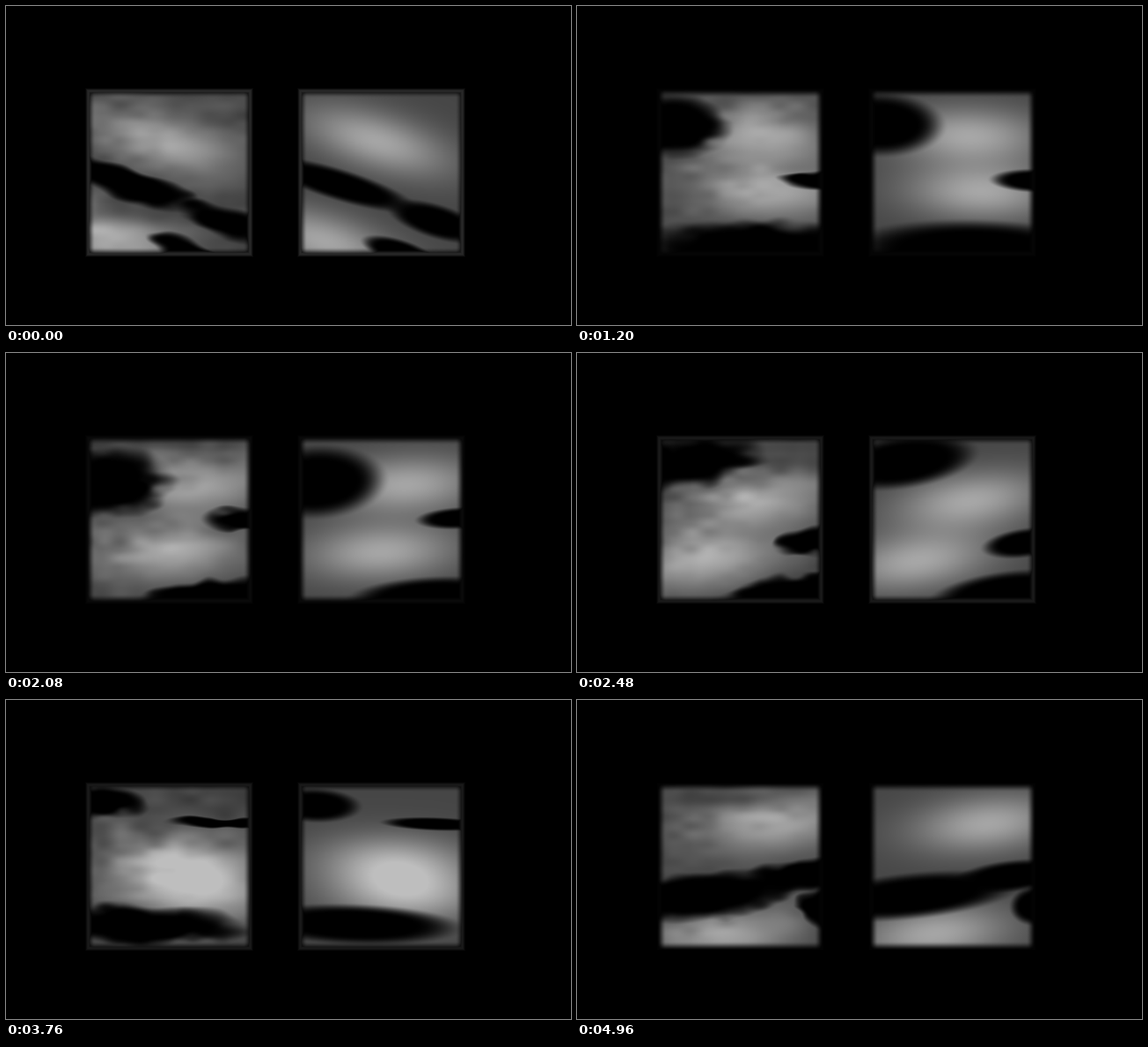
Recreate the animation shown at these times as an HTML page with a canvas. Size 642 by 362 pixels, loop 5040 ms.

```html
<!DOCTYPE html>
<html lang="en">
<head>
<meta charset="utf-8">
<title>Smoke</title>
<style>
  html, body { margin: 0; width: 100%; height: 100%; overflow: hidden; background: #000; }
  canvas { display: block; }
</style>
</head>
<body>
<canvas id="stage" width="642" height="362"></canvas>
<script>
const ctx = document.getElementById('stage').getContext('2d');
const LOOP = 5040, STEP = 80, W = 191, H = 192, TOP = 93;
const BASE = 70, GLOW = 95, PEAK = 190;

const light = (x, y) => [x, y, 85, 32];
const hole = (x, y, rx, ry) => [x, y, rx, ry];

// Two lights and three dark holes drift from pose to pose
const poses = [
  { time: 0, tilt: 17, lights: [light(90, 60), light(30, 174)],
    holes: [hole(46, 109, 66, 13), hole(158, 151, 42, 14), hole(115, 185, 32, 10)] },
  { time: 640, tilt: 1, lights: [light(95, 72), light(120, 112)],
    holes: [hole(20, 0, 55, 13), hole(190, 150, 40, 14), hole(95, 182, 150, 38)] },
  { time: 1680, tilt: 2, lights: [light(130, 38), light(135, 122)],
    holes: [hole(5, 76, 52, 38), hole(190, 66, 36, 6), hole(150, 187, 75, 15)] },
  { time: 2480, tilt: -8, lights: [light(115, 74), light(55, 143)],
    holes: [hole(38, 30, 62, 22), hole(178, 122, 36, 12), hole(155, 178, 62, 17)] },
  { time: 3120, tilt: 10, lights: [light(125, 75), light(90, 135)],
    holes: [hole(28, 17, 34, 13), hole(182, 51, 28, 5), hole(12, 127, 40, 7)] },
  { time: 4320, tilt: -5, lights: [light(95, 105), light(155, 122)],
    holes: [hole(12, 34, 42, 15), hole(135, 44, 60, 6), hole(110, 191, 130, 25)] },
  { time: 4960, tilt: -6, lights: [light(135, 47), light(75, 172)],
    holes: [hole(48, 129, 90, 19), hole(165, 106, 50, 13), hole(188, 140, 20, 16)] }
];

const mix = (a, b, k) => a + (b - a) * k;
const clamp = (v, lo, hi) => Math.min(hi, Math.max(lo, v));
const smooth = (lo, hi, v) => {
  const k = clamp((v - lo) / (hi - lo), 0, 1);
  return k * k * (3 - 2 * k);
};

// Each result measures the squared distance from an ellipse's centre, 1 on its outline
function ellipses(from, to, k, tilt) {
  const c = Math.cos(tilt * Math.PI / 180), s = Math.sin(tilt * Math.PI / 180);
  return from.map((shape, i) => {
    const [cx, cy, rx, ry] = shape.map((v, j) => mix(v, to[i][j], k));
    return (x, y) => {
      const dx = x - cx, dy = y - cy;
      const u = (dx * c + dy * s) / rx, v = (dy * c - dx * s) / ry;
      return u * u + v * v;
    };
  });
}

function poseAt(t) {
  const i = poses.findLastIndex((p, n) => n < poses.length - 1 && t >= p.time);
  const a = poses[i], b = poses[i + 1];
  const k = (t - a.time) / (b.time - a.time), tilt = mix(a.tilt, b.tilt, k);
  return {
    lights: ellipses(a.lights, b.lights, k, tilt),
    holes: ellipses(a.holes, b.holes, k, tilt)
  };
}

// Seeded lattice noise, -1 to 1
let seed = 7;
const lattice = Float32Array.from({ length: 4096 }, () => {
  seed = (seed * 16807) % 2147483647;
  return seed / 1073741823.5 - 1;
});
const cell = (x, y, z) => lattice[(x & 15) | (y & 15) << 4 | (z & 15) << 8];
function noise(x, y, z) {
  const i = Math.floor(x), j = Math.floor(y), l = Math.floor(z);
  const u = smooth(0, 1, x - i), v = smooth(0, 1, y - j);
  const plane = n => mix(
    mix(cell(i, j, n), cell(i + 1, j, n), u),
    mix(cell(i, j + 1, n), cell(i + 1, j + 1, n), u), v);
  return mix(plane(l), plane(l + 1), z - l);
}

function density({ lights, holes }, x, y, grain) {
  let v = BASE + grain;
  for (const q of lights) v += GLOW * Math.exp(-q(x, y));
  v = Math.min(v, PEAK);
  for (const q of holes) v *= smooth(0.6, 2.2, q(x, y));
  return v;
}

function drawPanel(left, pose, t, rough) {
  const image = ctx.createImageData(W, H), data = image.data;
  const z = t / 420, rim = 20 * (1 + Math.cos(2 * Math.PI * t / 3120));
  for (let y = 0, n = 0; y < H; y++) {
    for (let x = 0; x < W; x++, n += 4) {
      let sx = x, sy = y, grain = 0;
      if (rough) {
        const big = noise(x / 38, y / 18, z), fine = noise(x / 20 + 5, y / 10 + 3, z + 6);
        sx += 9 * fine;
        sy += 5 * big + 3 * fine;
        grain = 10 * big + 8 * fine;
      }
      const dx = Math.min(x, W - 1 - x), dy = Math.min(y, H - 1 - y), d = Math.min(dx, dy);
      const fog = density(pose, sx, sy, grain) * smooth(0, 11, dx) * smooth(0, 11, dy);
      const edge = rim * smooth(-1, 3, d) * (1 - smooth(3, 8, d));
      data[n] = data[n + 1] = data[n + 2] = Math.max(fog, edge);
      data[n + 3] = 255;
    }
  }
  ctx.putImageData(image, left, TOP);
}

function draw(t) {
  const pose = poseAt(t);
  drawPanel(90, pose, t, true);
  drawPanel(331, pose, t, false);
}

ctx.fillRect(0, 0, 642, 362);
let shown = 0;
const start = performance.now();
function tick(now) {
  const step = Math.floor(Math.max(0, now - start) % LOOP / STEP);
  if (step !== shown) draw((shown = step) * STEP);
  requestAnimationFrame(tick);
}
draw(0);
requestAnimationFrame(tick);
</script>
</body>
</html>
```
